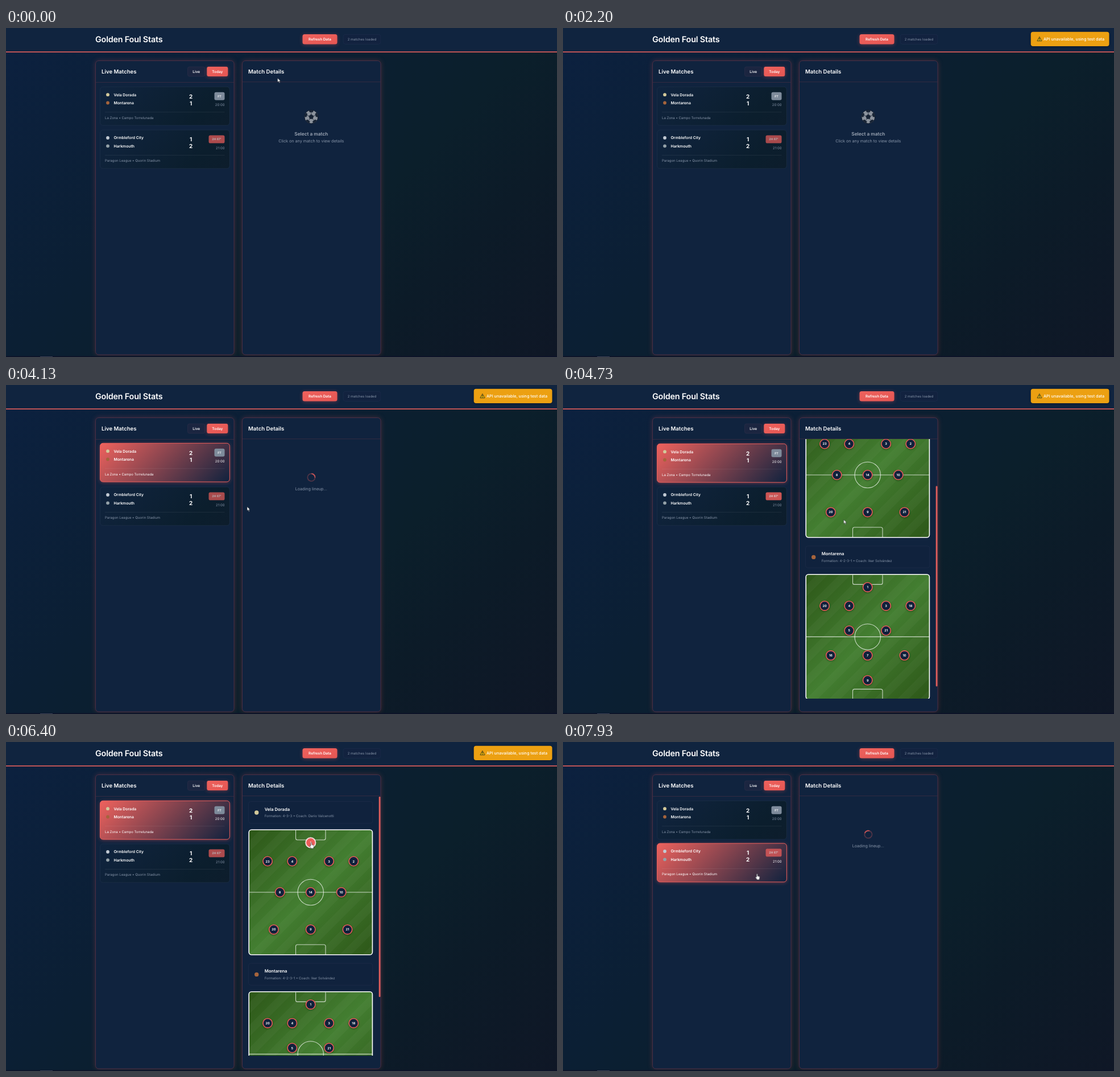
An HTML page that plays this animation: 969x578 px, repeating every 8000 ms.

```html
<!DOCTYPE html>
<html lang="en">
<head>
<meta charset="utf-8">
<title>Match board</title>
<style>
html, body { margin: 0; width: 100%; height: 100%; overflow: hidden; background: #0c1e30; }
svg { display: block; width: 100vw; height: 100vh; }
text { font-family: Inter, sans-serif; fill: #fff; text-rendering: geometricPrecision; white-space: pre; }
.semi { font-weight: 600; }
.bold { font-weight: 700; }
.mid { text-anchor: middle; }
.end { text-anchor: end; }
.dim { fill: #8795a9; }

.panel { fill: #10233e; stroke: #4b2f45; filter: drop-shadow(0 0 4px rgba(226, 80, 80, .25)); }
.rule { stroke: #e85a5a; stroke-opacity: .16; }
.glow { filter: drop-shadow(0 1.5px 3px rgba(233, 84, 84, .38)); }
.chalk { fill: none; stroke: #fff; stroke-opacity: .72; stroke-width: 1.1; }
.disc { fill: #10213c; stroke: #e95b59; stroke-width: 1.6; filter: drop-shadow(0 1px 1.5px rgba(0, 0, 0, .4)); }

.anim, .step { animation: 8s ease-in-out infinite; }
.step { animation-timing-function: step-end; }
.refresh { animation-name: refresh; }
.live { animation: live 2s -.8s ease-in-out infinite; }
.toast { animation-name: toast; }
.empty { animation-name: empty; }
.loading { animation-name: loading; }
.lineup { animation-name: lineup; }
.scroll { animation-name: scroll; }
.thumb { animation-name: thumb; }
.spin { animation: spin 1s linear infinite; transform-origin: 536.9px 162.4px; }
.lift0 { animation-name: lift0; }
.lift1 { animation-name: lift1; }
.active0 { animation-name: active0; }
.active1 { animation-name: active1; }
.hot0 { animation-name: hot0; }
.hot1 { animation-name: hot1; }
.shown { animation-name: shown; }
.cursor { animation-name: cursor; }
.hand { animation-name: hand; }
.arrow { animation-name: arrow; }

@keyframes refresh { 0%, 6%, 24.5%, 100% { transform: none } 9%, 22% { transform: translateY(-1px) } }
@keyframes live { 0%, 100% { opacity: 1 } 50% { opacity: .7 } }
@keyframes toast { 0%, 16.5%, 83%, 100% { opacity: 0 } 19%, 80.6% { opacity: 1 } }
@keyframes empty { 0% { opacity: 1 } 46.9%, 100% { opacity: 0 } }
@keyframes loading { 0%, 53.1% { opacity: 0 } 46.9%, 93.1%, 100% { opacity: 1 } }
@keyframes lineup { 0%, 93.1%, 100% { opacity: 0 } 53.1% { opacity: 1 } }
@keyframes scroll {
  0%, 54.5%, 73.5%, 100% { transform: none }
  59.125% { transform: translateY(-106px) }
  62%, 66.5% { transform: translateY(-133px) }
}
@keyframes thumb {
  0%, 54.5%, 73.5%, 100% { transform: none }
  59.125% { transform: translateY(81.5px) }
  62%, 66.5% { transform: translateY(102.3px) }
}
@keyframes spin { to { transform: rotate(360deg) } }
@keyframes lift0 { 0%, 38.5%, 54%, 100% { transform: none } 41.5%, 51.7% { transform: translateY(-1px) } }
@keyframes lift1 { 0%, 91% { transform: none } 94%, 100% { transform: translateY(-1px) } }
@keyframes active0 { 0%, 46.9%, 96%, 100% { opacity: 0 } 49.5%, 93.1% { opacity: 1 } }
@keyframes active1 { 0%, 93.1% { opacity: 0 } 96%, 100% { opacity: 1 } }
@keyframes hot0 { 0%, 78.5%, 83%, 100% { opacity: 0 } 79.7%, 81.8% { opacity: 1 } }
@keyframes hot1 { 0%, 85%, 89%, 100% { opacity: 0 } 86%, 87.5% { opacity: 1 } }
@keyframes shown { 0%, 33%, 100% { opacity: 1 } 24.5% { opacity: 0 } }
@keyframes cursor {
  0%, .75% { transform: translate(477.6px, 88px) }
  6.5%, 21.5% { transform: translate(549px, 17px) }
  24.5% { transform: translate(530px, 60px) }
  33% { transform: translate(528px, 70px) }
  40%, 47% { transform: translate(340px, 135px) }
  51.625% { transform: translate(424px, 213.7px) }
  59.125% { transform: translate(493.6px, 236.5px) }
  65.75% { transform: translate(499.5px, 231.5px) }
  76% { transform: translate(506px, 222px) }
  79.5%, 81.5% { transform: translate(537px, 176.5px) }
  86%, 87.5% { transform: translate(503px, 490px) }
  92%, 100% { transform: translate(341.5px, 231.5px) }
}
@keyframes hand {
  0%, 22%, 49.5%, 82%, 87.8% { opacity: 0 }
  6%, 38.5%, 79%, 85.5%, 91.5%, 100% { opacity: 1 }
}
@keyframes arrow {
  0%, 22%, 49.5%, 82%, 87.8% { opacity: 1 }
  6%, 38.5%, 79%, 85.5%, 91.5%, 100% { opacity: 0 }
}
</style>
</head>
<body>
<svg viewBox="0 0 969 578" preserveAspectRatio="none">
  <defs>
    <linearGradient id="sky" gradientUnits="userSpaceOnUse" x1="97.75" y1="-97.75" x2="871.25" y2="675.75">
      <stop stop-color="#0c2140"/><stop offset=".36" stop-color="#0b1f34"/>
      <stop offset=".62" stop-color="#0b1f2b"/><stop offset=".77" stop-color="#0c1b28"/>
      <stop offset="1" stop-color="#0f1726"/>
    </linearGradient>
    <linearGradient id="card" gradientUnits="userSpaceOnUse" x1="205" y1="63" x2="353" y2="211">
      <stop stop-color="#10243f"/><stop offset=".75" stop-color="#0b1e2d"/><stop offset="1" stop-color="#0d1d2c"/>
    </linearGradient>
    <linearGradient id="cardOn" gradientUnits="userSpaceOnUse" x1="205" y1="63" x2="353" y2="211">
      <stop stop-color="#ef625d"/><stop offset="1" stop-color="#10223e"/>
    </linearGradient>
    <linearGradient id="red" x2="1" y2="1">
      <stop stop-color="#ee625d"/><stop offset="1" stop-color="#e55653"/>
    </linearGradient>
    <linearGradient id="grass" x2="1" y2="1">
      <stop stop-color="#2d5718"/><stop offset=".5" stop-color="#437e31"/><stop offset="1" stop-color="#2d5718"/>
    </linearGradient>
    <linearGradient id="mown" gradientUnits="userSpaceOnUse" x1="427" y1="154" x2="447" y2="174" spreadMethod="repeat">
      <stop offset=".5" stop-color="#fff" stop-opacity="0"/><stop offset=".5" stop-color="#fff" stop-opacity=".03"/>
    </linearGradient>
    <clipPath id="view"><rect x="416" y="95.2" width="242.5" height="455.3"/></clipPath>
  </defs>

  <rect width="969" height="578" fill="url(#sky)"/>
  <rect width="969" height="42" fill="#10243f"/>
  <rect y="41.3" width="969" height="1.6" fill="#e8605c"/>
  <text x="157" y="24.7" font-size="14.4" class="semi" letter-spacing="-.2">Golden Foul Stats</text>

  <g class="anim refresh">
    <rect class="glow" x="521.5" y="11" width="61" height="17.5" rx="3.5" fill="url(#red)"/>
    <text x="552" y="22.2" font-size="6.4" class="semi mid">Refresh Data</text>
  </g>
  <rect x="593.2" y="11.3" width="65.6" height="17" rx="3.5" fill="#12223f" stroke="#1e2f4c" stroke-width=".7"/>
  <text x="626" y="22" font-size="6" class="dim mid">2 matches loaded</text>

  <rect class="panel" x="157.5" y="57.5" width="243.5" height="516.5" rx="5.5"/>
  <rect class="panel" x="415.5" y="57.5" width="243.5" height="516.5" rx="5.5"/>
  <path class="rule" d="M158 95.5H400.5M416 94.7H658.5"/>
  <text x="168" y="80.2" font-size="9.6" class="semi">Live Matches</text>
  <text x="426" y="79.6" font-size="9.6" class="semi">Match Details</text>
  <rect x="319.5" y="68.3" width="30.5" height="16.6" rx="3" fill="#1b2540" stroke="#2d3049" stroke-width=".7"/>
  <text x="334.7" y="79" font-size="6.4" class="semi mid">Live</text>
  <rect class="glow" x="353.3" y="68" width="37" height="17" rx="3" fill="url(#red)"/>
  <text x="371.8" y="79" font-size="6.4" class="semi mid">Today</text>

  <g id="cards"></g>

  <g class="step empty">
    <g transform="translate(536.8 156)">
      <circle r="12" fill="#8b929c" stroke="#0b1728"/>
      <g id="patches" fill="#172334" stroke="#172334" stroke-width=".7"></g>
    </g>
    <text x="536.8" y="189.4" font-size="8.3" class="semi mid" style="fill:#a0aab8">Select a match</text>
    <text x="536.8" y="201.2" font-size="7.2" class="dim mid">Click on any match to view details</text>
  </g>

  <g class="step loading">
    <g class="spin" fill="none" stroke="#ee605d" stroke-width="1.3">
      <circle cx="536.9" cy="162.4" r="6.6" stroke-opacity=".4"/>
      <path d="M532.2 157.7A6.6 6.6 0 0 1 541.6 157.7"/>
    </g>
    <text x="536.7" y="184.7" font-size="7.2" class="dim mid">Loading lineup...</text>
  </g>

  <g class="step lineup">
    <g clip-path="url(#view)"><g id="teams" class="anim scroll"></g></g>
    <rect class="anim thumb" x="655.7" y="96" width="2.8" height="352" rx="1.2" fill="#e15e5b"/>
  </g>

  <g class="anim toast">
    <rect x="822.7" y="6.8" width="137.8" height="25.2" rx="4" fill="#eca012" style="filter:drop-shadow(0 1px 2px rgba(0,0,0,.3))"/>
    <path d="M837.9 15.4L841.9 22.8H833.9Z" fill="#e8b80f" stroke="#3c3a1c" stroke-width=".9" stroke-linejoin="round"/>
    <path d="M837.9 17.6V20.3M837.9 21.1V22" stroke="#1d1d14"/>
    <text x="845" y="22" font-size="7.2" font-weight="500">API unavailable, using test data</text>
  </g>

  <rect y="576.4" width="969" height="1.6" fill="#0c1228"/>
  <rect x="60" y="577.2" width="22" height=".8" fill="#4b5266"/>

  <g class="step shown"><g class="anim cursor" fill="#fff" stroke="#10141c" stroke-width=".5">
    <path class="step arrow" d="M0 0V7.2L1.8 5.6 3 8.4 4.2 7.9 3 5.2H5.2Z"/>
    <path class="step hand" d="M-1 .8a.9.9 0 0 1 1.8 0V4l3 .8q.9.3.7 1.4l-.6 3.2q-.2 1.1-1.2 1.1H.6q-.8 0-1.3-.8L-2.9 6.6q-.4-.9.5-1.2.7-.1 1.4.7z"/>
  </g></g>
</svg>
<script>
const fill = (id, html) => { document.getElementById(id).innerHTML = html; };

const matches = [
  { teams: ['Vela Dorada', 'Montarena'], tints: ['#d3c99a', '#a5643c'], score: [2, 1],
    time: '20:00', place: 'La Zona • Campo Torrelunada', badge: 'FT', left: 366.5, color: '#7e8b9b' },
  { teams: ['Ormbleford City', 'Harkmouth'], tints: ['#c2cad3', '#94a1a8'], score: [1, 2],
    time: '21:00', place: 'Paragon League • Quorin Stadium', badge: "2H 67'", left: 356.5, color: '#ec5e5b', live: true }
];

const cardBox = (paint, extra) =>
  `<rect x="165.5" y="103.3" width="227.8" height="67.8" rx="5" fill="url(#${paint})" ${extra}/>
   <path d="M174 147.8H384.5" stroke="#fff" stroke-opacity=".1" stroke-width=".7"/>`;

const notes = (m, cls) =>
  `<text x="174" y="159.7" font-size="6" class="${cls}">${m.place}</text>
   <text x="384.5" y="136.8" font-size="6" class="end ${cls}">${m.time}</text>`;

const teamRow = (m, i) => {
  const y = 117.2 + i * 14.3;
  return `<circle cx="179" cy="${y}" r="2.9" fill="${m.tints[i]}"/>
    <text x="189.4" y="${y + 2.4}" font-size="6.8" class="semi">${m.teams[i]}</text>
    <text x="325.2" y="${123.5 + i * 12}" font-size="9.8" class="bold mid">${m.score[i]}</text>`;
};

fill('cards', matches.map((m, i) => `
  <g transform="translate(0 ${i * 75.8})"><g class="anim lift${i}">
    ${cardBox('card', 'stroke="#1d3048" stroke-width=".8"')}${notes(m, 'dim')}
    <g class="anim active${i}">
      ${cardBox('cardOn', 'class="glow" stroke="#ec605d"')}${notes(m, '')}
    </g>
    ${teamRow(m, 0)}${teamRow(m, 1)}
    <g class="${m.live ? 'live' : ''}">
      <rect x="${m.left}" y="112.8" width="${384.5 - m.left}" height="14" rx="2.8" fill="${m.color}"/>
      <text x="${(m.left + 384.5) / 2}" y="121.7" font-size="5.2" class="semi mid">${m.badge}</text>
    </g>
  </g></g>`).join(''));

// Each row: height on the pitch in %, side margin in %, shirt numbers.
const lineups = [
  { name: 'Vela Dorada', tint: '#d3c99a', info: '4-3-3 • Coach: Dario Valcenotti', hot: 1,
    rows: [[10, 50, [1]], [25, 15, [23, 4, 3, 2]], [50, 25, [8, 14, 10]], [80, 20, [20, 9, 21]]] },
  { name: 'Montarena', tint: '#a5643c', info: '4-2-3-1 • Coach: Iker Solvández', hot: 4,
    rows: [[10, 50, [1]], [25, 15, [20, 4, 3, 18]], [45, 35, [5, 21]], [65, 20, [16, 7, 10]], [85, 50, [9]]] }
];

const spread = (count, margin) =>
  count === 4 ? [15, 35, 65, 85] : Array.from({ length: count }, (_, i) =>
    count === 1 ? 50 : margin + i * (100 - 2 * margin) / (count - 1));

const player = (number, px, py, hot) => `
  <g transform="translate(${427.7 + px * 2.16} ${155 + py * 2.18})">
    <circle class="disc" r="8.2"/>
    ${hot ? `<circle class="anim ${hot}" r="8.7" fill="#ec5e5b" stroke="#fff" stroke-width="1.6"/>` : ''}
    <text y="2" font-size="5.6" class="bold mid">${number}</text>
  </g>`;

fill('teams', lineups.map((t, i) => `
  <g transform="translate(0 ${i * 284.4})">
    <rect x="426.5" y="104.5" width="218.3" height="38.3" rx="4" fill="#10223d" stroke="#1e2c48" stroke-width=".8"/>
    <circle cx="440.7" cy="124" r="3.7" fill="${t.tint}"/>
    <text x="454.7" y="120.6" font-size="7.6" class="semi">${t.name}</text>
    <text x="454.7" y="132.3" font-size="6" class="dim">Formation: ${t.info}</text>
    <rect x="427.2" y="154.3" width="217.2" height="219.4" rx="4.5" fill="url(#grass)"/>
    <rect x="427.2" y="154.3" width="217.2" height="219.4" rx="4.5" fill="url(#mown)" stroke="#fff" stroke-width="1.6"/>
    <path class="chalk" d="M428 264H644M509.5 155V169q0 3 3 3H559q3 0 3-3V155M509.5 373V359q0-3 3-3H559q3 0 3 3V373"/>
    <circle class="chalk" cx="535.7" cy="264" r="22.7"/>
    ${t.rows.map(([y, margin, numbers]) => spread(numbers.length, margin).map((x, k) =>
      player(numbers[k], x, y, numbers[k] === t.hot && `hot${i}`)).join('')).join('')}
  </g>`).join(''));

const patch = angle => `<g transform="rotate(${angle})">
  <path d="M0-4V-8" fill="none"/><path d="M-3.6-10.8L-2.6-8.2H2.6L3.6-10.8Q0-12.4-3.6-10.8Z"/></g>`;
fill('patches', '<path d="M0-4.2L4-1.3 2.5 3.4H-2.5L-4-1.3Z"/>' + [0, 72, 144, 216, 288].map(patch).join(''));
</script>
</body>
</html>
```
